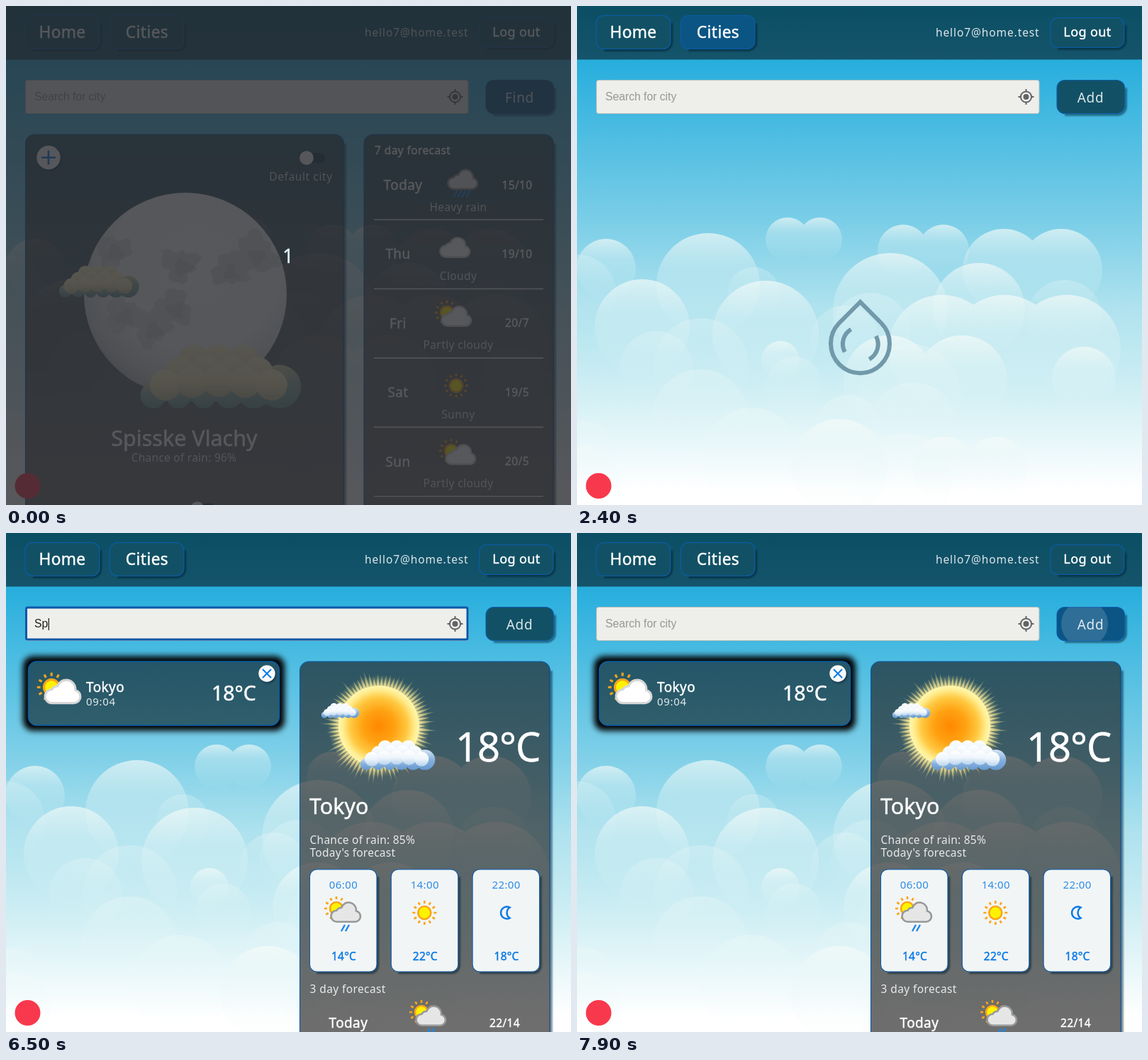
An HTML page that plays this animation: 797 by 703 pixels, repeating every 8 s.

```html
<!DOCTYPE html>
<html lang="en">
<head>
<meta charset="utf-8">
<title>Weather</title>
<style>
html, body { margin: 0; width: 100%; height: 100%; overflow: hidden; background: #fff; }
svg { display: block; width: 797px; height: 703px; }
text { font-family: "Noto Sans", "Open Sans", sans-serif; white-space: pre; }
.input { font-family: "Liberation Sans", Arial, sans-serif; font-size: 15.7px; }
</style>
</head>
<body>
<svg id="stage" viewBox="0 0 797 703" xmlns="http://www.w3.org/2000/svg"></svg>
<script>
const BLUE = "#0b7ae6", EDGE = "#0a5cab", TEAL = "#125165", HOVER = "#0b5585";
const CITY = "Spisske Vlachy", LOOP = 8000, TAU = 2 * Math.PI;

const times = (n, make) => Array.from({ length: n }, (_, i) => make(i));
const group = (body, attrs = "") => `<g ${attrs}>${body}</g>`;
const at = (x, y, body, scale = 1) => group(body, `transform="translate(${x} ${y}) scale(${scale})"`);
const disc = (x, y, r, fill, extra = "") => `<circle cx="${x}" cy="${y}" r="${r}" fill="${fill}" ${extra}/>`;
const rect = (x, y, w, h, r, fill, extra = "") =>
  `<rect x="${x}" y="${y}" width="${w}" height="${h}" rx="${r}" fill="${fill}" ${extra}/>`;
const path = (d, extra = "") => `<path d="${d}" ${extra}/>`;
const line = (d, color, width) => path(d, `fill="none" stroke="${color}" stroke-width="${width}"`);

// A closed outline whose radius depends on the angle
const outline = (x, y, n, radius, squash = 1) => "M" + times(n, i => {
  const a = i / n * TAU, r = radius(a, i);
  return `${(x + r * Math.cos(a)).toFixed(1)} ${(y + r * squash * Math.sin(a)).toFixed(1)}`;
}).join("L") + "Z";

// Light text is slightly transparent, medium text has a thin stroke of its own colour.
const LIGHT = 'fill-opacity=".86"', MEDIUM = 'stroke-width=".45"';
const label = (x, y, text, size = 15.5, { anchor = "start", fill = "#fff", gap = .4, look = LIGHT } = {}) =>
  `<text x="${x}" y="${y}" font-size="${size}" font-weight="300" text-anchor="${anchor}" fill="${fill}"
    ${look === MEDIUM ? `stroke="${fill}"` : ""} ${look} letter-spacing="${gap}">${text}</text>`;
const mid = (x, y, text, size, options = {}) => label(x, y, text, size, { anchor: "middle", ...options });
const strong = { look: MEDIUM };
const title = { look: MEDIUM, gap: 0 };

const gradient = (id, stops, kind = "linear", extra = 'x2="0" y2="1"') =>
  `<${kind}Gradient id="${id}" ${extra}>` + stops.map(([offset, color, opacity = 1]) =>
    `<stop offset="${offset}" stop-color="${color}" stop-opacity="${opacity}"/>`).join("") + `</${kind}Gradient>`;

function random(seed) {
  return () => (seed = seed * 16807 % 2147483647) / 2147483647;
}

const defs = `<defs>
${gradient("sky", [[0, "#1ba5d9"], [.11, "#27aedd"], [.45, "#80d0e8"], [.6, "#aee2ee"], [.75, "#cbedf3"], [.97, "#fff"]])}
${gradient("header", [[0, "#0b4f65"], [1, "#15546a"]])}
${gradient("mist", [[0, "#f6fbf8", .9], [.35, "#e9f7f6", .42], [1, "#e4f6f8", 0]])}
${gradient("card", [[0, "#245668"], [1, "#305e6c"]])}
${gradient("moon", [[0, "#fff"], [.62, "#fbfbfb"], [.85, "#dedede"], [1, "#b4b4b4"]], "radial", 'cx=".55" cy=".36" r=".68"')}
${gradient("nightPuff", [[0, "#fff8ca"], [.5, "#f3e6b2"], [1, "#c3bf9b"]])}
${gradient("nightBase", [[0, "#d9d3a6"], [.45, "#93b0a5"], [1, "#6b9896"]])}
${gradient("dayPuff", [[0, "#fff"], [.5, "#eef5fb"], [1, "#b6d2ec"]])}
${gradient("dayBase", [[0, "#d5e5f5"], [.5, "#86b1de"], [1, "#6598d0"]])}
${gradient("sun", [[0, "#ff8800"], [.4, "#ffa212"], [.7, "#ffc840"], [.9, "#ffee92"], [1, "#fff6ae"]], "radial", "")}
${gradient("glow", [[.65, "#fff0a0", .9], [1, "#ffe880", 0]], "radial", "")}
<filter id="blur" x="-20%" y="-40%" width="140%" height="180%"><feGaussianBlur stdDeviation="4.5"/></filter>
<filter id="soft" x="-20%" y="-30%" width="140%" height="160%"><feGaussianBlur stdDeviation="1.2"/></filter>
<clipPath id="moonEdge"><circle cx="253" cy="406" r="142"/></clipPath>
<clipPath id="actionEdge"><rect x="677" y="104.5" width="95" height="47" rx="10"/></clipPath>
</defs>`;

// A bank of cloud: equal lobes side by side that fade out downwards
function bank(x, top, r, lobes = 1, step = 0, opacity = .75) {
  const d = times(lobes, i => `M${x + i * step} ${top}a${r} ${r} 0 0 1 0 ${2 * r}a${r} ${r} 0 0 1 0 ${-2 * r}`).join("");
  return path(d, `fill="url(#mist)" opacity="${opacity}"`);
}
function cloudscape() {
  const rnd = random(11);
  const haze = times(16, i => bank(Math.round(800 * rnd()), 350 + 18 * i, Math.round(35 + 45 * rnd()), 1, 0, .3));
  const main = [
    [297, 298, 31, 2, 46], [460, 308, 36, 2, 57], [602, 314, 58, 2, 81], [185, 320, 73], [41, 328, 42],
    [442, 348, 81], [567, 362, 65], [92, 385, 67], [266, 387, 75], [515, 407, 76, 3, 88],
    [440, 464, 64, 2, 103], [287, 472, 27], [715, 480, 45], [370, 582, 68], [517, 607, 44, 2, 75]
  ].map(shape => bank(...shape));
  return haze.join("") + main.join("");
}

// Small weather icons
const sun = (x, y) => line(times(12, i => {
  const c = Math.cos(i / 12 * TAU), s = Math.sin(i / 12 * TAU);
  return `M${x + 13 * c} ${y + 13 * s}L${x + 17 * c} ${y + 17 * s}`;
}).join(""), "#f9a51a", 2.6) + disc(x, y, 9, "#fff200", 'stroke="#f9a51a" stroke-width="2.6"');
const cloud = (x, y, fill = "#fff", edge = "#d6d7d7") => at(x, y, path(
  "M8.5 28.7A8 8 0 0 1 8.5 12.7A7 7 0 0 1 15 9A10.8 10.8 0 0 1 36 13.5A7.7 7.7 0 0 1 34.5 28.7Z",
  `fill="${fill}" stroke="${edge}" stroke-width="2.6"`));
const grayCloud = (x, y) => cloud(x, y, "#e6e6e6", "#979999");
const rain = (x, y, count) => line(times(count, i => `M${x + i * 6} ${y}l-5 9`).join(""), "#1d87e8", 2.4);
const icons = {
  rain: grayCloud(17, 8) + rain(30.5, 39, 4),
  cloudy: cloud(6, 6.5),
  partly: sun(16, 16) + cloud(8, 6),
  sunny: sun(29, 21.5),
  showers: sun(16, 16) + grayCloud(8, 6) + rain(28, 39, 2)
};

// Puffy cloud in a 230 x 92 box: a row of base lobes below a widening pile
function puffs(kind) {
  const base = times(6, i => {
    const r = 17 + .95 * (i - 1.2) ** 2;
    return disc(22 + i * 35.5, 92 - r, r, `url(#${kind}Base)`);
  });
  const pile = times(3, row => times(3 + row, i => {
    const side = i / (2 + row) - .5;
    return disc(114 + side * (70 + 40 * row), 24 + 15 * row + 10 * side * side * row, 22, `url(#${kind}Puff)`);
  }).join(""));
  return rect(20, 50, 180, 32, 16, `url(#${kind}Base)`) + base.join("") + pile.join("");
}

function moon() {
  const rnd = random(41);
  const sea = (x, y, size, color) => {
    const p = TAU * rnd(), q = TAU * rnd();
    const ragged = a => size * (1 + .22 * Math.sin(3 * a + p) + .12 * Math.sin(7 * a + q) + .12 * (rnd() - .5));
    return path(outline(x, y, 60, ragged, .9), `fill="${color}"`);
  };
  const centres = [[150, 345], [245, 365], [315, 372], [350, 350], [165, 435], [235, 425], [205, 455]];
  const seas = centres.map(([x, y]) => sea(x, y, 24 + 8 * rnd(), "#dededd") + sea(x + 4, y + 3, 12, "#d0d0cf"));
  return disc(253, 406, 143, "url(#moon)") + group(seas.join(""), 'clip-path="url(#moonEdge)" opacity=".8"');
}

function bigSun(x, y) {
  const rnd = random(7);
  const rays = outline(x, y, 150, (_, i) => i % 2 ? 55 : 66 + 20 * rnd());
  return disc(x, y, 72, "url(#glow)", 'opacity=".7"') + path(rays, 'fill="url(#glow)"') + disc(x, y, 57, "url(#sun)");
}

// Boxes with a shadow to the lower right
const shadow = (x, y, w, h, r) => path(
  `M${x + w + 1.5} ${y + r}V${y + h + 1.5 - r}a${r} ${r} 0 0 1 ${-r} ${r}H${x + r}`,
  'fill="none" stroke="#031c2b" stroke-width="3" opacity=".6" filter="url(#soft)"');
const box = (x, y, w, h, r, fill, extra = "") => shadow(x, y, w, h, r) +
  rect(x, y, w, h, r, fill, `stroke="${EDGE}" stroke-width="1.1" ${extra}`);
const button = (x, y, w, h, id = "plain") => box(x, y, w, h, 11, TEAL, `class="${id}" id="${id}"`);
const panel = (x, w) => box(x, 181, w, 560, 13, "rgba(24,21,21,.62)");
const roundButton = (x, y, r, d, width) =>
  disc(x + 1.5, y + 2, r, "#07263a", 'opacity=".6" filter="url(#soft)"') + disc(x, y, r, "#fafafa") + line(d, BLUE, width);
const toggle = (x, y) => rect(x - 4, y - 7, 30, 14, 7, "#1c3743") + disc(x, y, 9.8, "#fcfcfc");

const forecast = [
  ["Today", "15/10", "Heavy rain", "rain"],
  ["Thu", "19/10", "Cloudy", "cloudy"],
  ["Fri", "20/7", "Partly cloudy", "partly"],
  ["Sat", "19/5", "Sunny", "sunny"],
  ["Sun", "20/5", "Partly cloudy", "partly", 6]
].map(([day, range, text, icon, shift = 0], i) => at(0, i * 97.45,
  mid(day.length > 3 ? 560 : 553, 259, day, 19, strong) + mid(721, 257.5, range, 15.5, strong) +
  mid(638, 288.5, text) + at(606 + shift, 221, icons[icon]) + line("M519 301H758", "#e9ecec", 1.6))).join("");

const home = panel(27.5, 449) + panel(505, 267.5) +
  roundButton(60, 213.5, 16.7, "M50 213.5h20M60 203.5v20", 2.7) +
  toggle(424, 214) + toggle(270, 708) + mid(416, 246, "Default city", 15.5, { gap: .6 }) +
  moon() + at(73, 365, puffs("night"), .498) + at(186, 475, puffs("night")) +
  mid(251.5, 620, CITY, 30.5, title) + mid(251, 642, "Chance of rain: 96%", 15.5, { gap: .25 }) +
  label(520, 209, "7 day forecast", 15.5, strong) + forecast;

const hourCards = [
  ["06:00", "14°C", at(21.5, 39, icons.showers)],
  ["14:00", "22°C", sun(47, 61)],
  ["22:00", "18°C", line("M52.5 53.5A8.5 8.5 0 1 0 52.5 68.5A9 9 0 0 1 52.5 53.5Z", BLUE, 2.5)]
].map(([time, temp, icon], i) => at(428.5 + i * 114.8, 474,
  box(0, 0, 94.5, 144, 10, "#f2f5f5") + icon + mid(47.5, 27, time, 15, { fill: BLUE }) +
  mid(48, 128, temp, 15.5, { fill: BLUE, look: MEDIUM, gap: .2 }))).join("");

const cities =
  rect(24, 173.5, 369, 105, 14, "#000", 'filter="url(#blur)"') +
  rect(31.5, 181, 354, 90, 12, "url(#card)", `stroke="${EDGE}" stroke-width="1.4"`) +
  at(45, 198, icons.partly, 1.2) +
  label(113, 223.5, "Tokyo", 19, strong) + label(113, 242.5, "09:04", 15, { gap: .7 }) +
  label(290, 236, "18°C", 28.5, title) +
  roundButton(368, 198, 11.7, "M362 192l12 12M374 192l-12 12", 2) +
  panel(414.5, 353) +
  bigSun(526, 272) + at(444, 239, puffs("day"), .236) + at(498, 291, puffs("day"), .466) +
  label(634, 322, "18°C", 56, { look: MEDIUM, gap: -1 }) +
  label(428, 396, "Tokyo", 30.5, title) +
  label(428.5, 438, "Chance of rain: 85%", 15.5, { gap: .25 }) + label(428.5, 455.5, "Today's forecast", 15.5, { gap: .25 }) +
  hourCards + label(428.5, 648, "3 day forecast") +
  label(455.5, 697, "Today", 19, strong) + at(570, 659, icons.showers) + mid(703.5, 696, "22/14", 15.5, strong);

const loader = line("M399.5 417L369.5 447A41.5 41.5 0 1 0 429.5 447Z", "#7199aa", 6) +
  group(line("M377 467A24 24 0 0 0 388.5 498M411 454A24 24 0 0 1 422.5 486", "#7199aa", 6), 'id="arcs"');

const header = rect(0, 0, 797, 75.5, 0, "url(#header)") +
  button(27, 13.5, 105, 47, "homeButton") + button(146.5, 13.5, 104.5, 47, "citiesButton") +
  button(667.5, 16.5, 104.5, 42, "logOut") +
  mid(79.5, 45, "Home", 22.7, strong) + mid(199, 45, "Cities", 22.7, strong) +
  label(506, 43, "hello7@home.test", 15.5, { gap: .9 }) + mid(720, 43, "Log out", 18, strong);

const search = rect(27.5, 104.5, 624.5, 47, 3, "#eeeeea", 'stroke="#b9c0bd"') +
  rect(28.5, 105, 622.5, 45, 2, "none", 'id="focusRing" stroke="#0c58a8" stroke-width="3"') +
  '<text id="query" class="input" x="40" y="133"></text>' +
  rect(40, 120, 1.2, 17, 0, "#111", 'id="caret"') +
  disc(633.5, 128, 7.6, "none", 'stroke="#626466" stroke-width="2"') + disc(633.5, 128, 4, "#626466") +
  line("M633.5 117v4M633.5 135v4M622.5 128h4M640.5 128h4", "#626466", 2) +
  button(677, 104.5, 95.5, 47, "action") +
  disc(716, 128, 33, "#fff", 'id="ripple" opacity=".15" clip-path="url(#actionEdge)"') +
  group(mid(724.5, 135.5, "Find", 19, { gap: .7 }), 'id="find"') +
  group(mid(724.5, 135.5, "Add", 19, { gap: .7 }), 'id="add"');

document.getElementById("stage").innerHTML = defs + rect(0, 0, 797, 703, 0, "url(#sky)") +
  cloudscape() + header + search +
  group(home, 'id="home"') + group(cities, 'id="cities"') + group(loader, 'id="loader"') +
  disc(30.5, 676, 18, "#f8394d") +
  group(rect(0, 0, 797, 703, 0, "rgba(40,41,47,.78)") + mid(398, 362, "1", 27, { fill: "#e2f6fa", look: MEDIUM, gap: 0 }), 'id="countdown"');

const byId = id => document.getElementById(id);
const show = (id, visible) => byId(id).setAttribute("display", visible ? "inline" : "none");
const set = (id, name, value) => byId(id).setAttribute(name, value);

function render(t) {
  const onCities = t >= 2500, adding = t >= 2400;
  const focused = t >= 5500 && t < 7200;
  const typed = t < 6500 || t >= 7900 ? "" : CITY.slice(0, 2 * (Math.floor((t - 6500) / 100) + 1));

  show("countdown", t < 100);
  show("home", t < 2300);
  show("loader", t >= 2300 && !onCities);
  show("cities", onCities);
  set("arcs", "transform", `rotate(${adding ? 36 : 0} 399.5 476)`);

  set("citiesButton", "fill", adding && t < 5500 ? HOVER : TEAL);
  set("action", "fill", !adding || t >= 7800 ? HOVER : TEAL);
  show("find", !adding);
  show("add", adding);
  show("ripple", t >= 7900);

  const query = byId("query");
  query.textContent = typed || "Search for city";
  set("query", "fill", typed ? "#1f1f1f" : "#969894");
  show("focusRing", focused);
  show("caret", focused && (t < 6000 || t >= 6500));
  set("caret", "x", typed ? 40.5 + query.getComputedTextLength() : 40);
}

function frame() {
  render(performance.now() % LOOP);
  requestAnimationFrame(frame);
}
frame();
</script>
</body>
</html>
```
